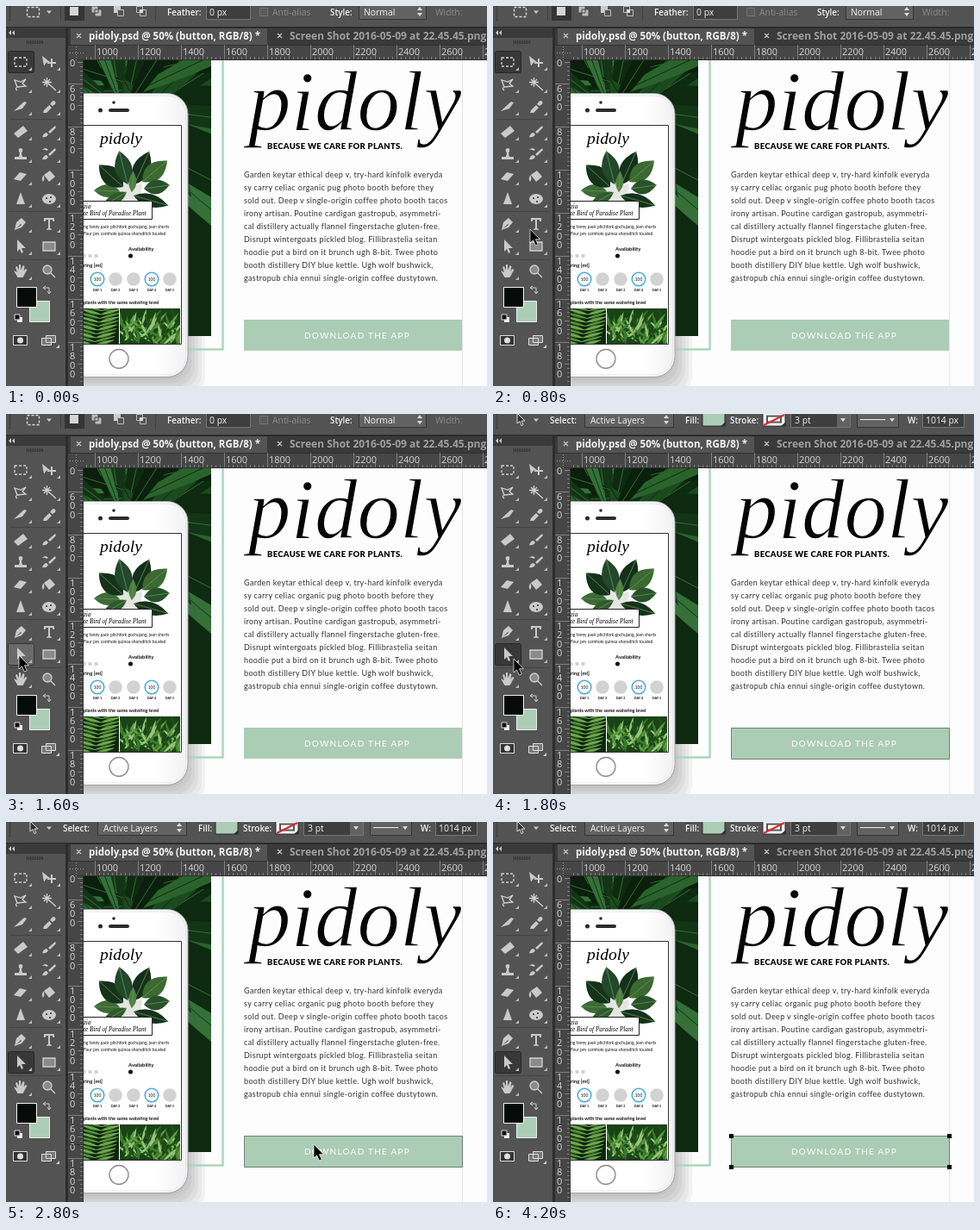
Animation, 558 px wide and 441 px high, one loop 4400 ms. Source, as an HTML page:

```html
<!DOCTYPE html>
<html lang="en">
<head>
<meta charset="utf-8">
<title>Selecting a button shape</title>
<style>
html, body { margin: 0; width: 100%; height: 100%; overflow: hidden; background: #535353; }
svg { display: block; }
text { white-space: pre; }
.ui { font: 10.4px "Open Sans", sans-serif; fill: #f4f4f4; }
.ui .b { font-weight: 600; font-size: 9.9px; }
.ui .dim { fill: #8b8b8b; }
.tab { font: bold 11.5px "Open Sans", sans-serif; fill: #f4f4f4; }
.ruler { font: 11px "Open Sans", sans-serif; fill: #d6d6d6; }
.copy { font: 9px Lato, sans-serif; letter-spacing: .36px; fill: #303030; }
.tiny { font: 4.9px Lato, sans-serif; fill: #111; }
.tiny .b { font-weight: bold; }
.brand, .label { font-family: "Liberation Serif", serif; font-style: italic; }
.field { fill: #3e3e3e; stroke: #757575; }
.menu { fill: #626262; stroke: #343434; }
</style>
</head>
<body>
<svg width="558" height="441" viewBox="0 0 558 441">
  <defs>
    <clipPath id="artClip"><path d="M90 63H558V441H90z"/></clipPath>
    <clipPath id="leafClip"><path d="M90 63H238V383H90z"/></clipPath>
    <clipPath id="fernClip"><path d="M90 351H131V392H90z"/></clipPath>
    <clipPath id="grassClip"><path d="M132 351H202V392H132z"/></clipPath>
    <linearGradient id="body"><stop offset=".8" stop-color="#fff"/><stop offset="1" stop-color="#f1f1f3"/></linearGradient>
  </defs>

  <!-- Artwork -->
  <g clip-path="url(#artClip)">
    <path fill="#fdfdfd" d="M90 63H558V441H90z"/>
    <g id="shadow" fill="#000" fill-opacity=".045"/>
    <path d="M251.5 63V398.5H200" fill="none" stroke="#abd6c0" stroke-width="2.5"/>
    <g id="leaves" clip-path="url(#leafClip)"><path fill="#0d2a10" d="M90 63H238V383H90z"/></g>
    <rect x="30" y="101.500" width="181" height="329" rx="24" fill="url(#body)" stroke="#a5a5a8"/>
    <rect x="33" y="104" width="175.500" height="324" rx="21" fill="none" stroke="#e6e6e8"/>
    <g fill="#2b2b2d"><circle cx="125" cy="112" r="1.800"/><circle cx="109.500" cy="121" r="2.500"/><rect x="119" y="119" width="24" height="4" rx="2"/></g>
    <path d="M80 138.500H203.500V392.500H80z" fill="#fff" stroke="#333"/>
    <circle cx="131" cy="409.500" r="11" fill="#fff" stroke="#8a8a8d" stroke-width="1.300"/>
    <text class="brand" x="109" y="160" font-size="19.600">pidoly</text>
    <g id="plant"><path d="M122 205l36 2-4 25h-28z" fill="#e5e6e3"/></g>
    <path d="M80 226.500H169.500V247.500H80z" fill="#fff" stroke="#222"/>
    <g class="label" font-size="7.260"><text x="90" y="234.500">zia</text><text x="90" y="243">te Bird of Paradise Plant</text></g>
    <g class="tiny">
      <text x="90" y="258">ng fanny pack pitchfork gochujang, jean shorts</text>
      <text x="90" y="266">Four jars cornhole quinoa shoreditch tousled</text>
      <text class="b" x="142" y="284" style="font-size:6px">Availability</text>
      <text class="b" x="90" y="303" style="font-size:6px">ring [ml]</text>
      <text class="b" x="90" y="346" style="font-size:5.600px">plants with the same watering level</text>
      <circle cx="144.500" cy="290" r="2.500"/>
      <g fill="#d2d2d2"><circle cx="90.500" cy="290" r="2.300"/><circle cx="97.500" cy="290" r="2.300"/><circle cx="104.500" cy="290" r="2.300"/></g>
      <g id="days" text-anchor="middle"/>
    </g>
    <g id="fern" clip-path="url(#fernClip)"><path fill="#0d260c" d="M90 351H131V392H90z"/></g>
    <g id="grass" clip-path="url(#grassClip)"><path fill="#1a4217" d="M132 351H202V392H132z"/></g>

    <path d="M529.500 63V441" stroke="#e2e4e6"/>
    <text class="brand" x="281" y="144" font-size="99" fill="#050505" stroke="#fdfdfd" stroke-width="1.300">pidoly</text>
    <text x="303" y="166" style="font:900 9.500px Lato,sans-serif;letter-spacing:.3px" fill="#0a0a0a">BECAUSE WE CARE FOR PLANTS.</text>
    <g id="copy" class="copy"/>
    <path fill="#abcdb5" d="M276 364H529V400H276z"/>
    <text x="346" y="385.500" style="font:10px Lato,sans-serif;letter-spacing:1.250px" fill="#fff">DOWNLOAD THE APP</text>
    <path id="outline" d="M276.500 364.500H529.500V400.500H276.500z" fill="none" stroke="#6d8375"/>
    <path id="handles" d="M274 362h5v5h-5zM527 362h5v5h-5zM274 398h5v5h-5zM527 398h5v5h-5z"/>
  </g>

  <!-- Rulers and tabs -->
  <path fill="#2d2d2d" d="M69 25H558V45H69zM69 45h3V441h-3z"/>
  <path fill="#393939" d="M72 26H558V45H72z"/>
  <path fill="#535353" d="M75 26H303V45H75z"/>
  <path fill="#464646" d="M72 45H558V63H90V441H72z"/>
  <path d="M72 45.500H558M72 62.500H558M89.500 63V441" stroke="#303030"/>
  <path d="M74 54.500h16M81.500 47v16" stroke="#999" stroke-dasharray="1 2"/>
  <g id="ruler" class="ruler"/>
  <path id="marks" stroke="#151515" stroke-dasharray="1 1"/>
  <g class="tab">
    <path d="M82 32l5 5m0-5l-5 5M315 32l5 5m0-5l-5 5" stroke="#c4c4c4" stroke-width="1.200"/>
    <text x="96" y="38.500">pidoly.psd @ 50% (button, RGB/8) *</text>
    <text x="329" y="38.500" fill="#a0a0a0" style="font-size:12px">Screen Shot 2016-05-09 at 22.45.45.png</text>
  </g>

  <!-- Options bar -->
  <path fill="#535353" d="M0 0H558V24H0z"/><path d="M0 24.500H558" stroke="#2a2a2a"/>
  <path d="M4.500 0V17" stroke="#333" stroke-width="2" stroke-dasharray="1 1"/>
  <path d="M47 5.500h6l-3 3.500z" fill="#ccc"/>
  <g id="marqueeBar" class="ui">
    <path d="M24.500 1.500h14v11h-14z" fill="none" stroke="#ddd" stroke-width="1.300" stroke-dasharray="3 2"/>
    <path d="M63.500 0V17M173.500 0V17" stroke="#404040"/>
    <path d="M68 -2H91V17H68z" fill="#343434"/>
    <path d="M74 1h10v10H74z" fill="#d5d5d5"/>
    <path d="M99 0h8v8h-8zM103 4h8v8h-8z" fill="#bcbcbc" stroke="#4a4a4a"/>
    <path d="M125 0h8v4h-4v4h-4z" fill="#ccc"/><path d="M129.500 4.500h7v7h-7zM151.500 .5h7v7h-7zM155.500 4.500h7v7h-7z" fill="none" stroke="#bbb"/>
    <path d="M155 4h4v4h-4z" fill="#ddd"/>
    <text class="b" x="187" y="10.500">Feather:</text>
    <path class="field" d="M232.500 -2H283.500V15.500H232.500z"/><text x="236" y="10.500">0 px</text>
    <path d="M294.500 2.500h9v9h-9z" fill="#5a5a5a" stroke="#747474"/><text class="dim" x="309" y="10.500">Anti-alias</text>
    <text class="b" x="376" y="10.500">Style:</text>
    <path class="menu" d="M409.500 -2H487.500V15.500H409.500z"/><text x="415" y="10.500">Normal</text>
    <path d="M477 5l3-4 3 4zM477 8l3 4 3-4z" fill="#ddd"/>
    <text class="dim" x="498" y="10.500">Width:</text>
  </g>
  <g id="pathBar" class="ui">
    <path d="M28 -1v12l3-2.500 2 5 2-1-2-4.500h4z" fill="#333" stroke="#ddd"/>
    <text class="b" x="66" y="10.500">Select:</text>
    <path class="menu" d="M106.500 -2H209.500V15.500H106.500z"/><text x="113" y="10.500">Active Layers</text>
    <path d="M198 5l3-4 3 4zM198 8l3 4 3-4z" fill="#ddd"/>
    <text class="b" x="223" y="10.500">Fill:</text>
    <path d="M243 -2h26V14h-26z" fill="#abcdb5" stroke="#2d2d2d"/>
    <text class="b" x="275" y="10.500">Stroke:</text>
    <path d="M313 -2h26V14h-26z" fill="#f5f5f5" stroke="#2d2d2d"/>
    <path d="M318 2.500h16v7h-16z" fill="#fff" stroke="#555" stroke-width="2"/><path d="M314 13L338 1" stroke="#d62b2b" stroke-width="2"/>
    <path d="M264 14h6v-5zM334 14h6v-5z" fill="#333"/>
    <path class="field" d="M345.500 -2H414.500V15.500H345.500z"/><path d="M399 -1h15V15h-15z" fill="#626262"/>
    <text x="350" y="10.500">3 pt</text>
    <path class="menu" d="M422.500 -2H470.500V15.500H422.500z"/><path d="M426 6.500H455" stroke="#eee"/>
    <path d="M403 5h6l-3 4zM460 5h6l-3 4z" fill="#ddd"/>
    <text class="b" x="481" y="10.500">W:</text>
    <path class="field" d="M498.500 -2H546.500V15.500H498.500z"/><text x="502" y="10.500">1014 px</text>
  </g>

  <!-- Toolbox -->
  <path fill="#535353" d="M0 25H69V441H0z"/><path fill="#3a3a3a" d="M0 25H69V37H0z"/>
  <path d="M6 28v6l-3-3zM10 28v6l-3-3z" fill="#ccc"/>
  <path d="M24 42H44" stroke="#303030" stroke-width="4" stroke-dasharray="1 1"/>
  <path d="M4 131.500H65M4 238.500H65M4 294.500H65" stroke="#444"/>
  <rect id="active" x="2.500" width="30" height="25" rx="2"/>
  <g id="tools"/>
  <path d="M27.500 342.500h23v24h-23z" fill="#abcdb5" stroke="#eee"/>
  <path d="M12.500 326.500h23v23h-23z" fill="#040b08" stroke="#f4f4f4"/>
  <path d="M44 327h6v6M46 325l-3 2 3 2M48 331l2 3 2-3" fill="none" stroke="#ccc"/>
  <path d="M13 361h6v6h-6z" fill="#eee"/><path d="M10 358h6v6h-6z" fill="#111" stroke="#ddd"/>
  <path d="M8.500 382.500h16v11h-16z" fill="#333" stroke="#ddd"/><circle cx="16.500" cy="388" r="3.500" fill="#ddd"/>
  <path d="M41.500 385.500h11v8h-11zM46.500 382.500h11v8h-11z" fill="#777" stroke="#ddd"/><path d="M58 397h4v-4z" fill="#ccc"/>

  <path id="cursor" d="M0 0v16l3.600-3.200 2.800 6.200 2.800-1.300-2.800-6h5z" fill="#000" stroke="#fff" stroke-width=".7"/>
</svg>
<script>
const $ = id => document.getElementById(id);
const add = (id, markup) => $(id).insertAdjacentHTML('beforeend', markup);
const repeat = (n, draw) => Array.from({ length: n }, (_, i) => draw(i)).join('');
let seed = 11;
const random = () => (seed = seed * 16807 % 2147483647) / 2147483647;

// A pointed leaf growing from (x, y) in the given direction
const leaf = (x, y, angle, length, width, fill, rib = 'none') =>
  `<g transform="translate(${x} ${y}) rotate(${angle})"><path fill="${fill}" d="M0 0Q${length * .45} ${-width} ${length} 0Q${length * .45} ${width} 0 0"/><path d="M0 0H${length}" stroke="${rib}" stroke-width=".7"/></g>`;

add('shadow', repeat(6, i => `<rect x="${30 + i * 4}" y="${105 + i * 4}" width="181" height="329" rx="24"/>`));

// Broad dark blades fanning out behind the phone
const greens = ['#1b4a1f', '#0a200c', '#2a632c', '#123516', '#347038', '#0e2a11'];
add('leaves', repeat(34, i =>
  leaf(135, 80 + random() * 70, i * 137.5, 150 + random() * 180, 18 + random() * 24, greens[i % 6], i % 2 ? '#47803f' : '#0a1d0b')));

add('plant', [
  [132, 215, -178, 30, 15, '#3d6b36'], [136, 210, -138, 38, 22, '#16331a'], [141, 207, -104, 40, 20, '#22482a'],
  [149, 207, -66, 42, 20, '#15301a'], [158, 204, -40, 38, 20, '#3b6a31'], [160, 212, -8, 30, 17, '#28522a'],
  [148, 220, 16, 42, 15, '#16331a'], [140, 216, 150, 32, 12, '#2f5b2c'], [146, 216, -86, 24, 9, '#4d8040']
].map(l => leaf(...l, '#6f9563')).join(''));

add('days', repeat(5, i => {
  const x = 106 + i * 21, full = i % 3 === 0;
  return `<circle cx="${x}" cy="317" r="7.8" ${full ? 'fill="#fff" stroke="#43a9d8" stroke-width="1.5"' : 'fill="#d2d2d2"'}/>` +
    (full ? `<text x="${x}" y="319">100</text>` : '') +
    `<text class="b" x="${x}" y="330.500" style="font-size:3.800px">DAY ${i + 1}</text>`;
}));

add('fern', repeat(22, i => {
  const y = 349 + (i >> 1) * 4.5;
  return leaf(112 - (i >> 1), y, i % 2 ? -15 : 195, 24, 4, i % 4 < 2 ? '#5d9440' : '#336b28', '#8fbf68');
}));
add('grass', repeat(90, i =>
  leaf(132 + random() * 70, 396 - random() * 26, -155 + random() * 130, 10 + random() * 18, 3, ['#5f9c40', '#1d5019', '#98c478', '#3a7d2c'][i % 4])));

add('copy', [
  'Garden keytar ethical deep v, try-hard kinfolk everyda',
  'sy carry celiac organic pug photo booth before they',
  'sold out. Deep v single-origin coffee photo booth tacos',
  'irony artisan. Poutine cardigan gastropub, asymmetri-',
  'cal distillery actually flannel fingerstache gluten-free.',
  'Disrupt wintergoats pickled blog. Fillibrastelia seitan',
  'hoodie put a bird on it brunch ugh 8-bit. Twee photo',
  'booth distillery DIY blue kettle. Ugh wolf bushwick,',
  'gastropub chia ennui single-origin coffee dustytown.'
].map((line, i) => `<text x="276" y="${199 + i * 15}">${line}</text>`).join(''));

const tickSize = i => i % 10 === 0 ? 17 : i % 5 === 0 ? 6 : 3;
add('ruler',
  `<path stroke="#8e8e8e" stroke-width=".8" d="${repeat(94, i => `M${93.5 + i * 5} 62v${-tickSize(i + 8)}`)}${repeat(75, i => `M89 ${65.5 + i * 5}h${-tickSize(i + 5)}`)}"/>` +
  repeat(10, i => `<text x="${105 + i * 50}" y="57">${1000 + i * 200}</text>`) +
  '<text x="74" y="70">0</text>' +
  repeat(7, i => [...String(600 + i * 200)].map((digit, k) =>
    `<text x="74" y="${100 + i * 50 + k * 10.3}">${digit}</text>`).join('')));

// Icon outlines, two per row; a leading "~" means stroked rather than filled
const brush = 'M-8 6q2-5 5-5l2 2q-2 4-7 3zM-1 0L7-7l1 2-7 7z';
const icons = [
  '~M-7-5h14v10h-14z', 'M-8-7l9 7-4 .5-3 4zM2-4h2v4h4v2h-4v4h-2v-4h-4v-2h4z',
  '~M-7-5l3 8 10-1-4-3 4-5-6 3zM-4 3q-3 2 0 4', '~M-2-2L8 7M-6-6l7 7M1-6l-7 7M-2.500-8v11M-8-2.500h11',
  'M-8 5L4-6l3 1-5 7z', 'M-7 7l1-3 6-6 3 3-6 6zM1-3l3-4q5 0 3 4l-3 2z',
  'M-8 2L3-7 8-1-3 7z', brush,
  'M-7 6h14v-3h-5l-1-4q3-6-1-6t-1 6l-1 4h-5z', brush + 'M-8-5q4-4 7 0l-2 1q-2-2-5-1z',
  'M-8 3l7-8 8 2-7 8z', 'M-6-2l7-5 6 7-7 6zM-6-2q-4 4-1 8 2-2 1-8z',
  'M0-8l5 14h-10z', 'M-8 0a8 6 0 1 0 16 0a8 6 0 1 0-16 0M-4-2h2v2h-2zM1-3h2v2h-2zM0 2h2v2h-2z',
  'M-7 7l2-9 6-5 5 5-5 6zM-6 6L0 0l1 1z', 'M-6-7h12v4h-1.500l-1-2h-2.500v10l2 .8v1h-6v-1l2-.8v-10h-2.500l-1 2h-1.500z',
  'M-4-8v14l3-3 2 5 2-1-2-5h5z', '~M-7-5h14v10h-14z',
  'M-8-1l4 2-2-6 2-1 2 5v-7h2l.5 7 2-6 2 1-1 6 2-3 2 1-5 9h-6z', '~M-7-2a5 5 0 1 0 10 0a5 5 0 1 0-10 0M2 2l5 5'
];
const rows = [65, 91, 117, 146, 172, 198, 224, 253, 279, 308];
add('tools', icons.map((icon, i) => {
  const stroked = icon[0] === '~';
  const paint = stroked ? `fill="${i > 16 ? '#8a8a8a' : 'none'}" stroke="#d0d0d0" stroke-width="1.300"` : 'fill="#cacaca" fill-rule="evenodd"';
  return `<g transform="translate(${i % 2 ? 50 : 17} ${rows[i >> 1]})"><path ${paint} ${i ? '' : 'stroke-dasharray="3 2"'} d="${icon.replace('~', '')}"/>` +
    (i === 19 ? '' : '<path d="M9 10h4v-4z" fill="#bbb"/>') + '</g>';
}).join(''));

// Pointer position at each 200 ms step, beginning with FIRST
const STEP = 200, LOOP = 4400, FIRST = 3;
const route = [
  [150, 300], [43, 259], [34, 268], [20, 279], [15, 280], [15, 280], [24, 284], [130, 292],
  [238, 295], [280, 318], [325, 350], [357, 374], [388, 388], [414, 390], [421, 382], [470, 420]
];
const show = (id, visible) => $(id).setAttribute('display', visible ? 'inline' : 'none');
const set = (id, values) => Object.entries(values).forEach(([key, value]) => $(id).setAttribute(key, value));

function draw(now) {
  const step = Math.floor(now % LOOP / STEP);
  const point = route[step - FIRST];
  const chosen = step >= 9, hover = step >= 6 && !chosen;

  show('cursor', point);
  if (point) set('cursor', { transform: `translate(${point})` });
  const [x, y] = point || [520, 441];
  show('marks', chosen && x > 90);
  set('marks', { d: `M${x + .5} 46V62M73 ${y + .5}H89` });

  show('marqueeBar', !chosen);
  show('pathBar', chosen);
  show('outline', chosen);
  show('handles', step >= 16);
  set('active', { y: chosen || hover ? 266.5 : 52.5, fill: hover ? '#6a6a6a' : '#383838', stroke: hover ? '#343434' : '#262626' });
  requestAnimationFrame(() => draw(performance.now() - start));
}
const start = performance.now();
draw(0);
</script>
</body>
</html>
```
